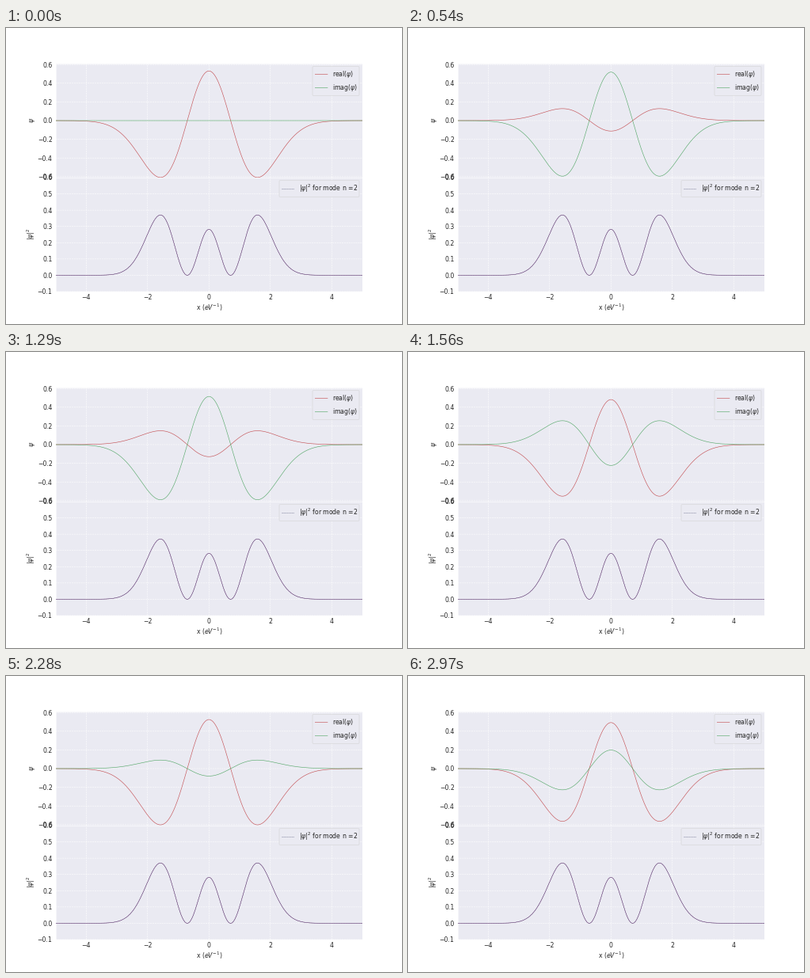
Animation of 500 by 374 pixels, one loop 3000 ms. Source, as a matplotlib script:

```python
import numpy as np
import matplotlib.pyplot as plt
from matplotlib.animation import FuncAnimation
from matplotlib.lines import Line2D
from matplotlib.patches import FancyBboxPatch

W, H, DPI = 500, 374, 100
PX = 72 / DPI                      # points per pixel
FRAMES, INTERVAL = 100, 30
ENERGY, DT = 2.5, 0.1              # second excited state

RED, GREEN, PURPLE, SLATE = "#C44E52", "#55A868", "#8F5590", "#454A6E"
INK, PANEL = "#262626", "#EAEAF2"
FONT = 7.8 * PX
THIN = 0.6 * PX

plt.rcParams.update({
    "font.family": "DejaVu Sans",
    "font.size": FONT,
    "mathtext.fontset": "dejavusans",
    "text.color": INK,
    "axes.labelcolor": INK,
    "xtick.color": INK,
    "ytick.color": INK,
})

fig = plt.figure(figsize=(W / DPI, H / DPI), dpi=DPI, facecolor="white")


def panel(top, bottom, ylim, yticks):
    ax = fig.add_axes([0.125, 1 - bottom / H, 0.775, (bottom - top) / H])
    ax.set_facecolor(PANEL)
    ax.set(xlim=(-5, 5), ylim=ylim, xticks=range(-4, 5, 2), yticks=yticks)
    ax.set_axisbelow(True)
    ax.grid(color="white", lw=0.55 * PX, ls="--", snap=False)
    ax.tick_params(length=0, labelsize=FONT)
    ax.tick_params(axis="x", pad=3.4 * PX)
    ax.tick_params(axis="y", pad=4 * PX)
    for spine in ax.spines.values():
        spine.set(color="white", lw=0.6 * PX, zorder=1)
    return ax


def to_fig(x, y):
    return x / W, 1 - y / H


def legend(left, top, right, bottom, rows):
    """Boxed key in pixel coordinates; rows hold (y, label, line style)."""
    fig.add_artist(FancyBboxPatch(
        (left, H - bottom), right - left, bottom - top,
        boxstyle="round,pad=0,rounding_size=1.5", transform=None,
        facecolor=PANEL, edgecolor=(0.8, 0.8, 0.8, 0.6), lw=0.7 * PX, zorder=5))
    for y, label, style in rows:
        x0, yf = to_fig(left + 3.3, y)
        x1, _ = to_fig(left + 19, y)
        fig.add_artist(Line2D([x0, x1], [yf, yf], zorder=6, **style))
        fig.text(*to_fig(left + 25, y + 2.8), label, va="baseline", zorder=6)


x = np.linspace(-5, 5, 500)
mode = (1 - 2 * x**2) * np.exp(-x**2 / 2) / (np.sqrt(2) * np.pi**0.25)

wave = panel(45, 189, (-0.61, 0.61), np.linspace(-0.6, 0.6, 7))
prob = panel(189, 333, (-0.1, 0.6), np.linspace(-0.1, 0.6, 8))
wave.tick_params(labelbottom=False)

fig.text(*to_fig(33.7, 116.5), r"$\psi$", rotation=90, ha="center", va="center")
fig.text(*to_fig(31.5, 260.2), r"$|\psi|^2$", rotation=90, ha="center", va="center")
fig.text(*to_fig(256.3, 356.6), r"x ($eV^{-1}$)", ha="center", va="baseline")

real_style = dict(color=RED, lw=THIN, snap=False)
imag_style = dict(color=GREEN, lw=THIN, snap=False)
dash_style = dict(color=SLATE, lw=0.4 * PX, ls="--", snap=False)

real, = wave.plot(x, mode, **real_style)
imag, = wave.plot(x, 0 * x, **imag_style)
prob.plot(x, mode**2, color=PURPLE, lw=THIN, snap=False)
prob.plot(x, mode**2, **dash_style)

legend(387, 48.5, 446, 85.5, [(58.5, r"real($\psi$)", real_style),
                              (75.5, r"imag($\psi$)", imag_style)])
legend(345, 192.5, 446, 213.5,
       [(203.2, r"$|\psi|^2$ for mode n =2", dash_style)])


def update(i):
    psi = mode * np.exp(-1j * ENERGY * DT * i)
    real.set_ydata(psi.real)
    imag.set_ydata(psi.imag)
    return real, imag


anim = FuncAnimation(fig, update, frames=FRAMES, interval=INTERVAL,
                     repeat=True, repeat_delay=0)
plt.show()
```
